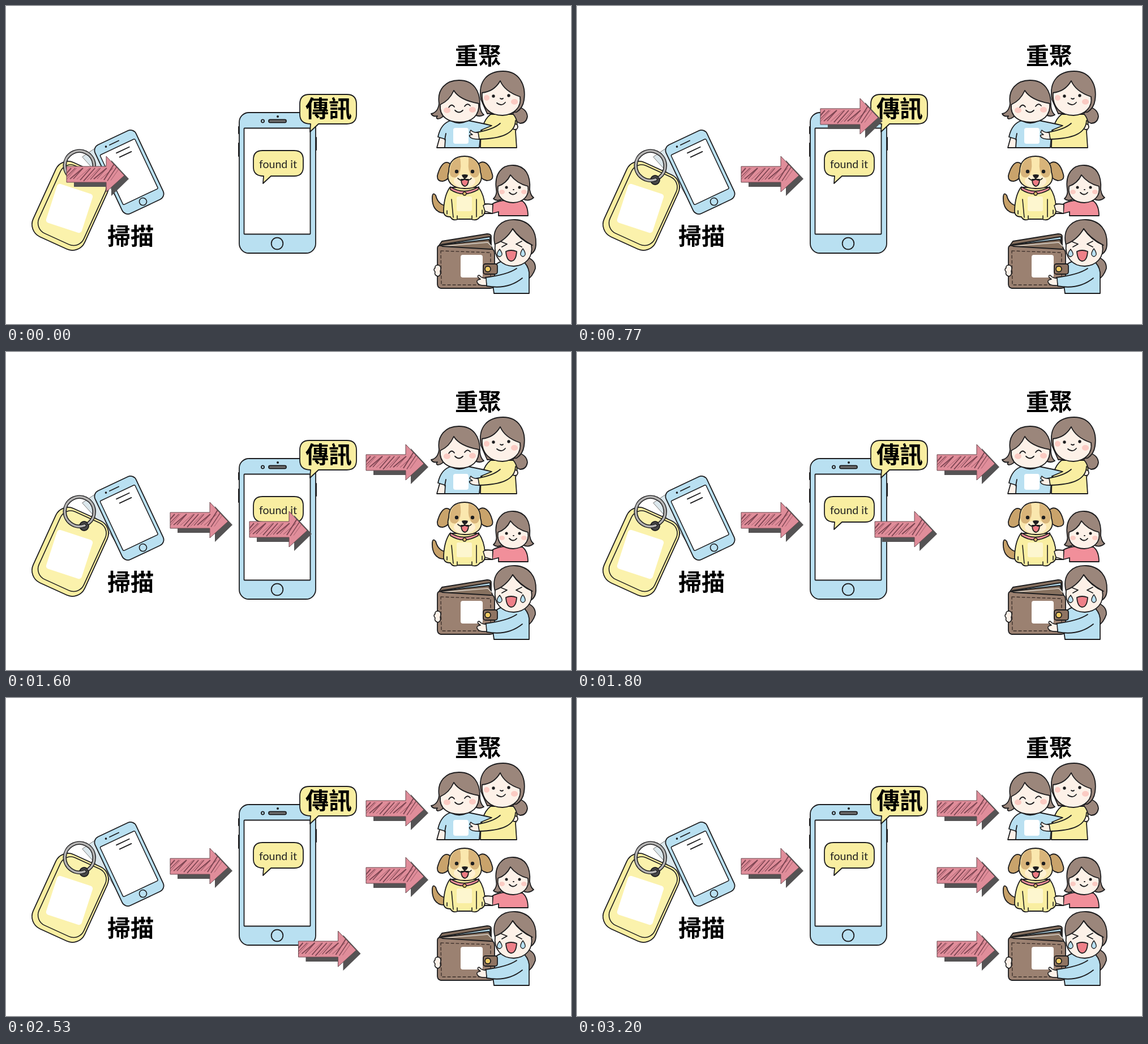
Write an HTML page that moves like this. It is 998 px wide and 561 px high and loops after 4010 ms.

```html
<!DOCTYPE html>
<html lang="zh-TW">
<head>
<meta charset="utf-8">
<style>
html, body { margin: 0; width: 100%; height: 100%; overflow: hidden; background: #fff; }
svg { display: block; width: 100vw; height: 100vh; }
.ink { stroke: #1d1d1f; stroke-width: 1.8; stroke-linejoin: round; stroke-linecap: round; fill: none; }
.hair { fill: #9b867b; } .skin { fill: #fdf1e8; } .blue { fill: #b9e0f1; }
.yellow { fill: #f9eea1; } .white { fill: #fff; } .pink { fill: #f18f9a; }
.cheek { fill: #fbcbc3; stroke: none; } .dot { fill: #1d1d1f; stroke: none; } .plain { stroke: none; }
.label { font: 900 41px "Noto Sans CJK TC", "Noto Sans CJK", sans-serif; fill: #000; }
</style>
</head>
<body>
<svg viewBox="0 0 998 561">
  <defs>
    <clipPath id="shape"><path d="M0 19H70V1L102 35L70 64V47H0Z"/></clipPath>
    <g id="arrow">
      <path d="M13 30L80 27L79 8L110 41L79 71V55H13Z" fill="#555354"/>
      <path d="M0 19H70V1L102 35L70 64V47H0Z" fill="#e08d9a"/>
      <g id="hatch" clip-path="url(#shape)" stroke="#7d4552" fill="none"/>
      <path d="M0 19H70V1L102 35L70 64V47H0Z" fill="none" stroke="#69484e"/>
    </g>
  </defs>

  <!-- scanning phone -->
  <g class="ink">
    <path d="M135 266L160 249L208 360L185 322Z" fill="#dbe7ec" stroke="#777" stroke-width="1"/>
    <g transform="translate(217.5 293) rotate(-25.2)">
      <rect class="blue" x="-40" y="-67" width="80" height="134" rx="11"/>
      <rect class="white" x="-34" y="-49" width="68" height="97" rx="2" stroke-width="1.5"/>
      <path d="M-11 -58H7M-6 -40H19M-4 -31H19"/>
      <circle class="dot" cx="-18" cy="-58" r="1.8"/>
      <circle cy="57.5" r="6.5" stroke-width="1.6"/>
    </g>
  </g>

  <!-- key tag -->
  <g class="ink">
    <g transform="translate(113.5 352.5) rotate(24.5)">
      <rect class="yellow" x="-50" y="-72" width="100" height="144" rx="24"/>
      <rect x="-41" y="-68" width="87" height="131" rx="20" fill="#fbf2ac" stroke-width="1.6"/>
    </g>
    <rect class="white plain" x="-33" y="-36" width="66" height="72" rx="5" transform="translate(112 357) rotate(18)"/>
    <circle cx="138" cy="307" r="8" fill="#4a4a4a"/>
    <path d="M139 306A26 26 0 1 1 146 302" stroke-width="6.5"/>
    <path d="M139 306A26 26 0 1 1 146 302" stroke="#b4b3b2" stroke-width="3.5"/>
  </g>

  <!-- message phone -->
  <g class="ink">
    <path d="M411 213V225M411 242V265M548 232V254" stroke-width="2"/>
    <rect class="blue" x="412" y="188" width="135" height="248" rx="17"/>
    <rect class="white" x="420.500" y="215.500" width="117" height="187" rx="1"/>
    <rect x="464" y="200.500" width="31" height="5" rx="2.500" fill="#777"/>
    <circle cx="453.500" cy="203" r="2.600"/><circle class="dot" cx="480" cy="195" r="2"/>
    <circle cx="479" cy="419" r="10.300"/>
    <path class="yellow" d="M453 255H509Q525 255 525 271V284Q525 300 509 300H468L454 313L455 300Q437 300 437 284V271Q437 255 453 255Z"/>
    <path class="yellow" d="M536 156H602Q619 156 619 173V191Q619 208 602 208H552L537 222L538 208Q519 208 519 191V173Q519 156 536 156Z"/>
  </g>
  <text x="447" y="285.500" font-family="Lato, Noto Sans, sans-serif" font-size="19.500" fill="#222">found it</text>
  <text class="label" x="529" y="196">傳訊</text>
  <text class="label" x="179" y="421">掃描</text>
  <text class="label" x="793" y="103">重聚</text>

  <!-- mother and child -->
  <g class="ink">
    <path class="hair" d="M905 178Q920 182 921 195Q919 207 908 207Q897 203 895 190Z"/>
    <path class="hair" d="M839 165C833 131 852 115 878 115C907 115 919 140 915 166Q913 180 902 187L850 190Z"/>
    <path class="yellow" d="M856 191C843 201 838 219 838 250H902L900 221Q907 204 896 191Z"/>
    <path class="skin" d="M841 153C839 180 856 193 877 193C898 192 911 178 908 160Q881 151 873 132Q862 151 841 153Z"/>
    <circle class="skin" cx="899" cy="213" r="5"/>
    <path class="hair" d="M765 172C761 147 777 131 800 131C826 131 838 150 837 176Q838 187 844 192Q834 198 823 188H778Q769 200 762 199Q759 198 762 194Q754 196 751 190Q763 188 765 172Z"/>
    <path class="skin" d="M770 218L761 250H776L780 225Z"/>
    <path class="blue" d="M786 202Q768 207 763 231L776 235L775 250H836L839 219L858 211Q842 207 816 202Q800 211 786 202Z"/>
    <path class="skin" d="M767 174C765 196 782 205 801 205C823 205 837 193 835 172Q801 166 791 149Q783 167 767 174Z"/>
    <path d="M775 236L777 225M782 179Q787 171 792 178M810 177Q815 170 820 176M793 184Q800 191 807 184"/>
    <ellipse class="cheek" cx="779" cy="184" rx="6" ry="5"/><ellipse class="cheek" cx="824" cy="183" rx="6" ry="5"/>
    <ellipse class="cheek" cx="849" cy="162" rx="5" ry="5"/><ellipse class="cheek" cx="898" cy="169" rx="6" ry="5"/>
    <circle class="dot" cx="861" cy="159" r="2.700"/><circle class="dot" cx="888" cy="158" r="2.700"/>
    <path d="M873 163Q876 165 878 163M867 171Q875 178 882 170"/>
    <rect class="white plain" x="790" y="215" width="27" height="28" rx="4"/>
    <path class="yellow" d="M900 202C899 226 874 234 835 235L831 223Q861 218 873 207"/>
    <path class="skin" d="M834 223Q826 224 821 219L819 223L824 227Q817 227 819 230Q821 235 836 235Z" stroke-width="1.600"/>
  </g>

  <!-- dog and girl -->
  <g class="ink">
    <path class="hair" d="M866 323C862 296 876 280 896 281C918 282 927 299 925 324Q927 335 932 338Q923 346 912 340H877Q868 346 861 340Q868 333 866 323Z"/>
    <path class="pink" d="M878 343Q865 345 858 350L859 366L870 363V370H922Q922 351 912 344Z"/>
    <path class="skin" d="M869 318C866 338 880 347 896 347C914 346 925 335 922 318Q902 313 891 298Q884 313 869 318Z"/>
    <path class="skin" d="M860 350L844 349L843 366L859 366Z"/>
    <circle class="dot" cx="884" cy="320" r="2.500"/><circle class="dot" cx="907" cy="320" r="2.500"/>
    <ellipse class="cheek" cx="876" cy="328" rx="5" ry="4"/><ellipse class="cheek" cx="915" cy="328" rx="5" ry="4"/>
    <path d="M889 329Q896 336 902 329M896 324H897"/>
    <path d="M774 365C759 365 752 353 753 336Q754 328 759 334Q763 350 776 352Z" fill="#c7a169"/>
    <path class="yellow" d="M784 320Q774 334 773 360Q772 372 785 372Q789 380 799 376H821Q832 380 837 372Q848 370 846 354Q845 334 835 320Z"/>
    <path d="M787 341L790 373M831 341L831 372M797 370V376M823 370V376M779 361V367M841 360V367" stroke-width="1.600"/>
    <path d="M786 280C775 268 766 284 762 299Q761 310 772 309Q784 306 788 291ZM833 280C845 268 855 281 859 297Q862 308 849 308Q838 306 832 291Z" fill="#c9a36b"/>
    <path d="M782 292C782 273 794 265 810 265C826 265 838 275 838 293C845 313 829 323 810 322C790 322 776 311 782 292Z" fill="#fae7ae"/>
    <path class="plain" d="M802 267Q786 270 784 290Q783 305 796 302Q805 292 803 275ZM817 267Q834 271 836 289Q837 305 824 302Q815 292 817 275Z" fill="#d8b47a"/>
    <ellipse class="plain" cx="810" cy="309" rx="19" ry="11" fill="#fff1d3"/>
    <path d="M804 306Q804 317 811 318Q817 316 817 306Z" fill="#ed7b83"/>
    <path class="dot" d="M805 298Q810 296 816 298Q815 304 810 304Q806 303 805 298Z"/>
    <path d="M798 304Q806 311 810 304Q815 311 822 304" stroke-width="1.700"/>
    <circle class="dot" cx="796" cy="292" r="3.200"/><circle class="dot" cx="824" cy="292" r="3.200"/>
    <path d="M785 319Q808 334 835 319L834 324Q808 339 785 324Z" class="pink" stroke-width="1.600"/>
    <circle cx="810" cy="331" r="3" fill="#efbd67" stroke-width="1.300"/>
    <rect class="plain" x="796" y="336" width="27" height="26" rx="3" fill="#fdf6cf"/>
    <path class="skin" d="M858 350Q847 348 843 352L846 362L859 366" stroke-width="1.600"/>
  </g>

  <!-- wallet and girl -->
  <g class="ink">
    <path class="hair" d="M918 442Q936 448 935 463Q930 478 920 483Q912 471 917 446Z"/>
    <path class="hair" d="M863 418C858 391 876 376 899 377C924 378 937 396 936 420Q936 434 925 439L868 440Z"/>
    <path class="blue" d="M875 451Q863 453 857 472L862 507H924V470Q922 456 912 450Z"/>
    <path class="skin" d="M864 420C861 444 876 459 897 459C917 458 932 444 928 421Q906 409 895 393Q883 413 864 420Z"/>
    <path d="M895 393Q908 413 930 422M875 416L885 420L876 425M911 415L901 420L911 425"/>
    <path d="M883 433Q892 429 902 433Q901 450 892 450Q884 449 883 433Z" fill="#ee8088"/>
    <path class="blue" d="M872 429Q866 436 868 440Q872 445 876 439Q877 436 872 429ZM913 428Q908 435 909 439Q913 445 917 439Q918 435 913 428Z" stroke-width="1.300"/>
    <path d="M763 425L770 415L850 402Q858 402 857 408V425Z" fill="#86705f"/>
    <path d="M769 421L855 407V423Z" class="blue"/>
    <path d="M767 422L853 412L860 430H766Z" fill="#87715f"/>
    <path d="M768 424L851 417L858 424" stroke="#d9d2c9" stroke-width="1.500"/>
    <path d="M762 428Q762 420 771 424L856 429Q863 428 863 438V490Q863 498 855 498H768Q762 497 762 490Z" fill="#9b8171"/>
    <path d="M768 432L856 435V492H769Z" stroke="#3d302b" stroke-width="1.400" stroke-dasharray="5 4"/>
    <rect class="white plain" x="803" y="439" width="39" height="40" rx="4"/>
    <rect x="843" y="455" width="25" height="18" rx="4" fill="#8f7462"/>
    <circle cx="851" cy="464" r="5" fill="#f0ca64"/>
    <path class="skin" d="M764 457Q757 457 758 462Q754 465 758 469Q756 475 763 477Q769 475 767 468Q770 459 764 457Z" stroke-width="1.600"/>
    <path class="blue" d="M902 463Q886 474 847 479L849 494Q886 501 912 480"/>
    <path class="skin" d="M848 480Q841 481 836 475Q832 475 834 479L838 482Q831 483 832 487Q834 494 849 493Z" stroke-width="1.600"/>
  </g>
  <g id="arrows"></g>
</svg>
<script>
const NS = "http://www.w3.org/2000/svg";
const add = (parent, tag, attrs) => {
  const el = document.createElementNS(NS, tag);
  for (const key in attrs) el.setAttribute(key, attrs[key]);
  return parent.appendChild(el);
};

// Hand-drawn diagonal hatching
const hatch = document.getElementById("hatch");
for (let i = 0; i < 16; i++) {
  const x = i * 6 - 12, wobble = Math.sin(i * 2.7);
  const top = x > 60 ? 14 : 22, bottom = 45 - 4 * Math.abs(wobble);
  add(hatch, "path", {
    d: `M${x} ${bottom}L${x + 20 + 3 * wobble} ${top}`,
    "stroke-width": 1.3 + 0.7 * Math.cos(i * 1.9)
  });
}

// Each path: [time, x], with eased starts and stops
const arrows = [
  { y: 264, path: [[0, 107], [430, 240], [650, 290]] },
  { y: 162, path: [[750, 428], [1100, 623], [1400, 636]] },
  { y: 280, path: [[1580, 428], [1720, 480], [2030, 644], [2120, 647], [2450, 636]] },
  { y: 410, path: [[2330, 424], [2530, 516], [2670, 589], [2830, 643], [3200, 636]] }
];
const layer = document.getElementById("arrows");
for (const a of arrows) a.el = add(layer, "use", { href: "#arrow" });

function slope(path, i) {
  const a = path[i - 1], b = path[i], c = path[i + 1];
  if (!a || !c || (b[1] - a[1]) * (c[1] - b[1]) <= 0) return 0;
  const before = (b[1] - a[1]) / (b[0] - a[0]), after = (c[1] - b[1]) / (c[0] - b[0]);
  return 2 * before * after / (before + after);
}

function position(path, t) {
  const i = path.findIndex(p => p[0] > t);
  if (i < 0) return path[path.length - 1][1];
  const [t0, x0] = path[i - 1], [t1, x1] = path[i];
  const d = t1 - t0, u = (t - t0) / d, v = 1 - u;
  return x0 * v * v * (1 + 2 * u) + x1 * u * u * (3 - 2 * u)
    + d * u * v * (slope(path, i - 1) * v - slope(path, i) * u);
}

function draw(now) {
  const t = now % 4010;
  for (const { el, y, path } of arrows) {
    const shown = t >= path[0][0];
    el.style.display = shown ? "" : "none";
    if (shown) el.setAttribute("transform", `translate(${position(path, t)} ${y})`);
  }
  requestAnimationFrame(draw);
}
draw(0);
</script>
</body>
</html>
```
